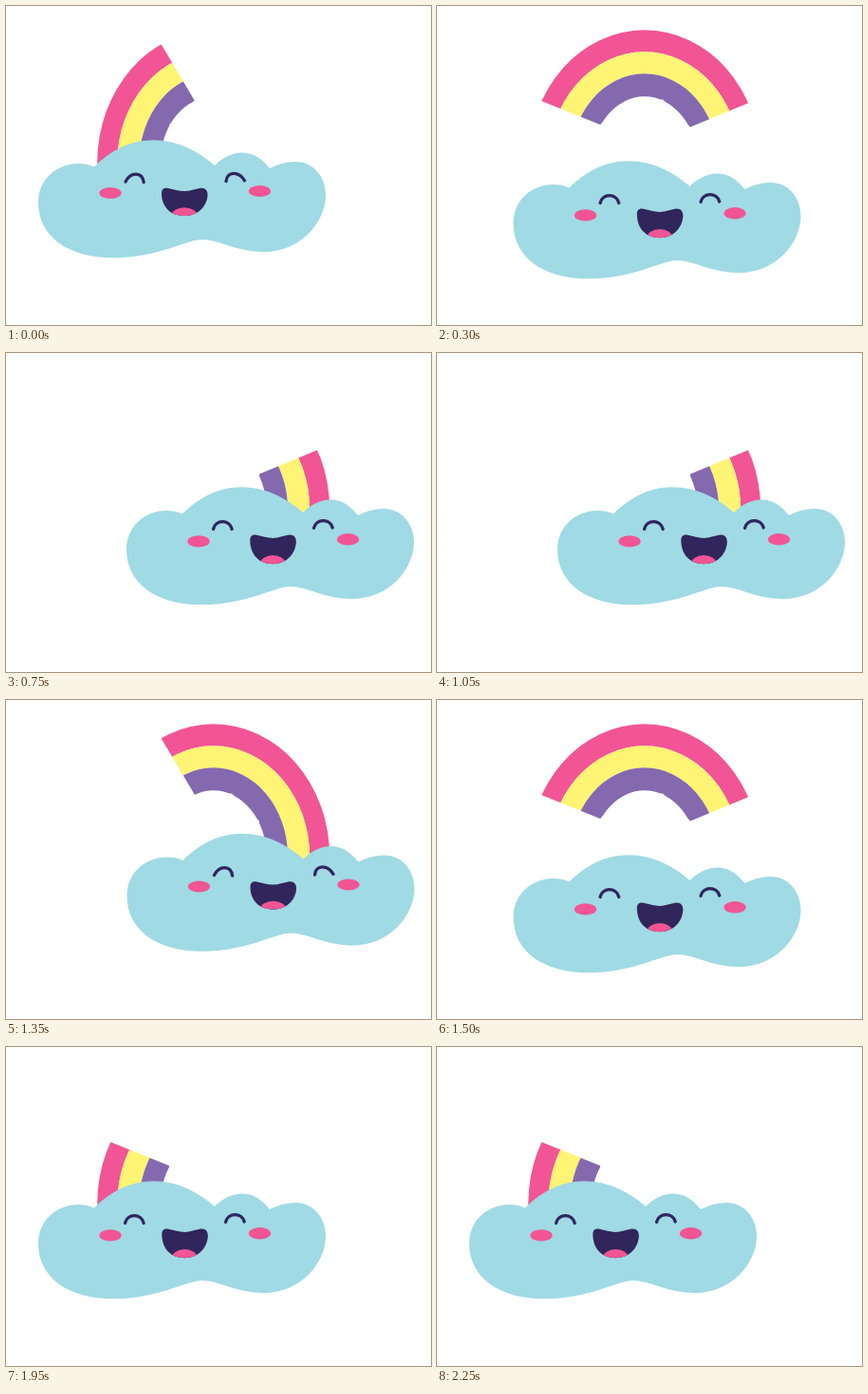
Recreate the animation shown at these times as an HTML page. Size 448 by 336 pixels, loop 2400 ms.

```html
<!DOCTYPE html>
<html lang="en">
<head>
<meta charset="utf-8">
<title>Rainbow cloud</title>
<style>
  html, body { margin: 0; width: 100%; height: 100%; overflow: hidden; background: #fff; }
  svg { display: block; width: 448px; height: 336px; }
  .eye { fill: none; stroke: #30265e; stroke-width: 3.3; stroke-linecap: round; }
  .pink { fill: #f15595; }
</style>
</head>
<body>
<svg viewBox="0 0 448 336">
  <defs>
    <clipPath id="sweep"><polygon id="wedge"/></clipPath>
    <path id="lips" d="M164 197C164 193 166.5 190.8 171 191.8C177 193 182 194.8 188 194.8C194 194.8 199 192.4 205 191.5C210 191 213 194 212.5 200C211 212 202 221 188 221C174 221 164 212 164 197Z"/>
    <clipPath id="inside"><use href="#lips"/></clipPath>
  </defs>
  <g id="rainbow" clip-path="url(#sweep)"></g>
  <g id="cloud">
    <path fill="#a0dae4" d="M93 169.500C110 152 132 141.200 155 141.200C181 141.200 203 153 220 168C228 160 238 154.500 249 154.500C261 154.500 270 161 278 171C286 167 295 164 305 164C324 164 337 180 337 199C337 228 310 259 272 259C243 259 224 246 207 246C190 246 160 265.300 113 265.300C66 265.300 34 243 34 207C34 182 54 166 76 166C82 166 88 167 93 169.500Z"/>
    <path class="eye" id="eyeL"/>
    <path class="eye" id="eyeR"/>
    <ellipse class="pink" id="cheekL" cx="110" rx="11.600"/>
    <ellipse class="pink" id="cheekR" cx="267.500" rx="11.600"/>
    <g id="mouth">
      <use href="#lips" fill="#31265b"/>
      <ellipse class="pink" cx="188" cy="221" rx="13.500" ry="8.800" clip-path="url(#inside)"/>
    </g>
  </g>
</svg>
<script>
const $ = id => document.getElementById(id);
const STEP = 150, CX = 218.7, CY = 165;

// Concentric half ellipses with short straight legs
const rings = [[122.5, 139.7], [101.4, 116.7], [78.4, 93.7], [56, 69.7]];
const colors = ['#f15595', '#fff473', '#8569af'];
const band = ([ax, ay], [bx, by]) =>
  `M${CX - ax} 190V${CY}A${ax} ${ay} 0 0 1 ${CX + ax} ${CY}V190` +
  `H${CX + bx}V${CY}A${bx} ${by} 0 0 0 ${CX - bx} ${CY}V190Z`;
colors.forEach((fill, i) => {
  const path = document.createElementNS('http://www.w3.org/2000/svg', 'path');
  path.setAttribute('d', band(rings[i], rings[i + 1]));
  path.setAttribute('fill', fill);
  $('rainbow').append(path);
});

// Cut lines across the arch, left to right: outer point, then inner point
const cuts = [
  [[95, 192], [170, 192]],
  [[110, 100], [172, 125]],
  [[164, 41], [199, 100]],
  [[276.5, 41.5], [238, 98.5]],
  [[330, 101.5], [267, 127.5]],
  [[342, 192], [268, 192]]
];
const outward = ([o, i]) => i.map((v, k) => v + (o[k] - v) * 2.2);
const wedge = (a, b) => {
  const part = cuts.slice(a, b + 1);
  return [...part.map(outward), ...part.map(c => c[1]).reverse()].join(' ');
};

// Eye curves, cheek height and size, mouth placement
const poses = {
  rest: {
    eyeL: 'M125.500 185.500C128 175 142.500 175 145.200 185.500',
    eyeR: 'M231.500 184.300C234 174 248.500 174 251.200 184',
    cheek: 198.4, ry: 6.2, mouth: [0.3, 0, 1, 1.04]
  },
  tilt: {
    eyeL: 'M126 185C131.500 174.500 143.500 174.500 145.200 185.700',
    eyeR: 'M232 184.600C233 173.500 245.500 174 251.500 183.800',
    cheek: 197, ry: 6, mouth: [0, 0.3, 1, 0.99]
  },
  wide: {
    eyeL: 'M124 184.800C128 176.500 141 176 146 185.200',
    eyeR: 'M230.300 183.800C234 175.500 247 175.500 252 184.300',
    cheek: 198, ry: 5.6, mouth: [0.3, -0.8, 0.97, 1.07]
  }
};

// Cloud offset, first and last cut of the visible arch, pose
const steps = [
  [0, 0, 0, 2, 'tilt'],
  [0, 0, 0, 3, 'tilt'],
  [46.5, 22, 1, 4, 'rest'],
  [93, 0, 2, 5, 'wide'],
  [93, 0, 3, 5, 'wide'],
  [93, 0, 4, 5, 'rest'],
  [93, 0, 5, 5, 'rest'],
  [93, 0, 4, 5, 'rest'],
  [93.5, -0.5, 3, 5, 'tilt'],
  [93.5, -0.5, 2, 5, 'tilt'],
  [46.5, 22, 1, 4, 'rest'],
  [-0.4, -0.5, 0, 3, 'wide'],
  [-0.4, -0.5, 0, 2, 'wide'],
  [0, 0, 0, 1, 'rest'],
  [0, 0, 0, 0, 'rest'],
  [0, 0, 0, 1, 'rest']
];

function setCheek(id, cy, ry) {
  $(id).setAttribute('cy', cy);
  $(id).setAttribute('ry', ry);
}

function show([dx, dy, a, b, name]) {
  const p = poses[name], [mx, my, sx, sy] = p.mouth;
  $('cloud').setAttribute('transform', `translate(${dx} ${dy})`);
  $('rainbow').style.display = a === b ? 'none' : '';
  $('wedge').setAttribute('points', wedge(a, b));
  $('eyeL').setAttribute('d', p.eyeL);
  $('eyeR').setAttribute('d', p.eyeR);
  setCheek('cheekL', p.cheek, p.ry);
  setCheek('cheekR', p.cheek - 2.1, p.ry);
  $('mouth').setAttribute('transform',
    `translate(${188 + mx} ${191 + my}) scale(${sx} ${sy}) translate(-188 -191)`);
}

const start = performance.now();
let current = -1;
function tick() {
  const i = Math.floor((performance.now() - start) / STEP) % steps.length;
  if (i !== current) show(steps[current = i]);
  requestAnimationFrame(tick);
}
tick();
</script>
</body>
</html>
```
